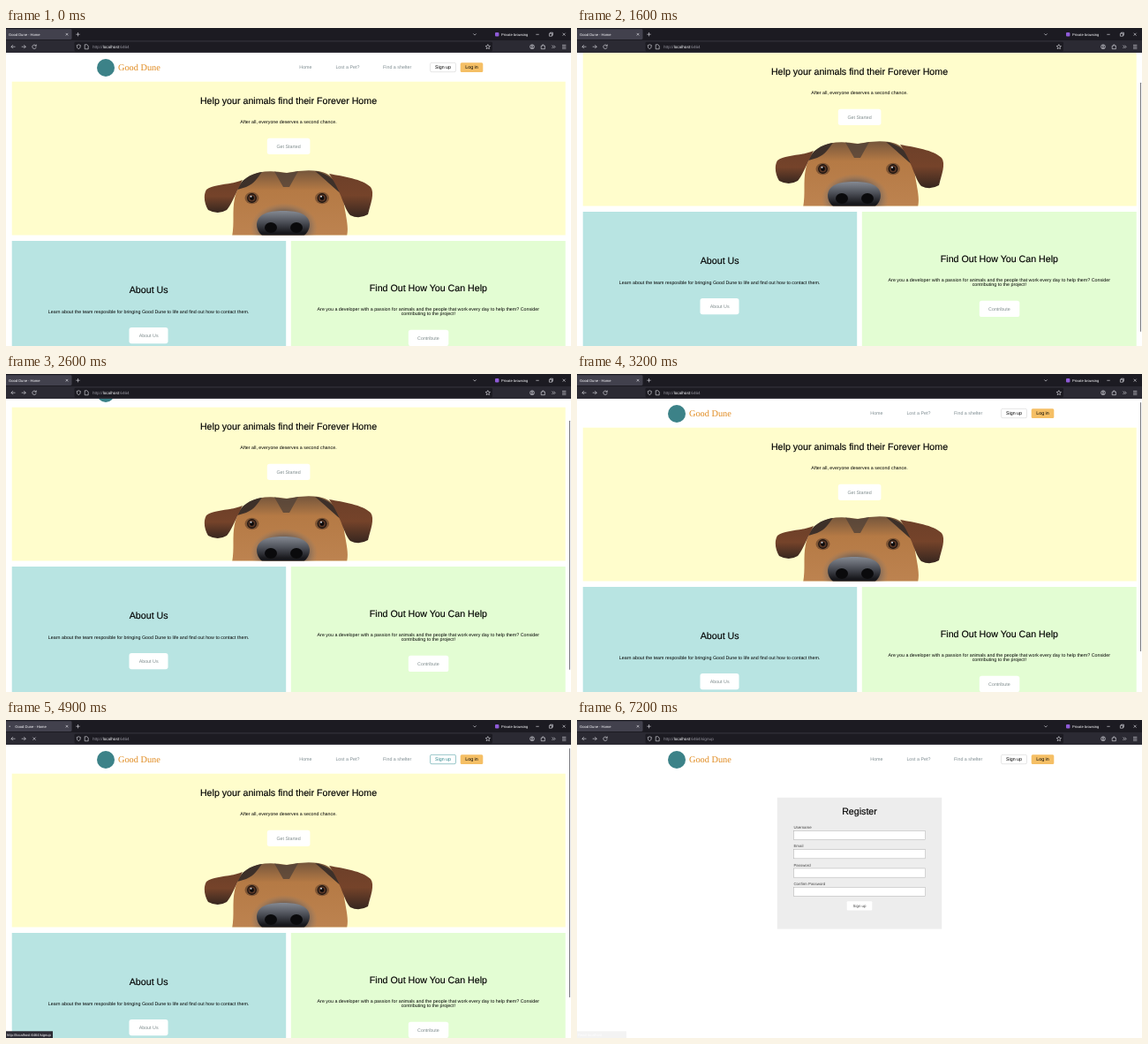
An HTML page for the animation above (8 s loop, 640 by 360 pixels).

```html
<!DOCTYPE html>
<html lang="en">
<head>
<meta charset="utf-8">
<title>Good Dune - Home</title>
<style>
  html, body { margin: 0; width: 100%; height: 100%; overflow: hidden; background: #fff; }
  svg { display: block; width: 100vw; height: 100vh; }
  text { font: 5.333px "Liberation Sans", Arial, sans-serif; text-rendering: geometricPrecision; white-space: pre; }
  .mid { text-anchor: middle; }
  .head { font-size: 10.667px; stroke: #000; stroke-width: .15; }
  .brand { font: 10.3px "Liberation Serif", Times, serif; fill: #e08a1e; }
  .nav { fill: #7f8d92; }
  .soft { fill: #7f8c8d; }
  .btn { fill: #fff; }
  .form text { font-size: 4.4px; fill: #444; }
  .form .head { font-size: 10.667px; fill: #000; }
  .form .field { fill: #fff; stroke: #adadad; stroke-width: .5; }
  .ui { font-size: 4.1px; fill: #fbfbfe; }
  .url { font-size: 4.667px; fill: #96959f; }
  .icon { fill: none; stroke: #e8e8ee; stroke-width: .6; }
  #signBox { fill: #fff; stroke: #d5d5d5; stroke-width: .6; }
  .hover #signBox { stroke: #58a3a6; }
  .hover #signText { fill: #2d878c; }
</style>
</head>
<body>
<svg viewBox="0 0 640 360" preserveAspectRatio="none">
  <defs>
    <clipPath id="heroClip"><rect x="6.7" y="60.7" width="627" height="173.8"/></clipPath>
    <linearGradient id="fur" x2="0" y2="1">
      <stop stop-color="#75563c"/><stop offset=".3" stop-color="#b57a45"/><stop offset="1" stop-color="#bd8350"/>
    </linearGradient>
    <linearGradient id="ear" x2="0" y2="1">
      <stop stop-color="#6d4029"/><stop offset=".5" stop-color="#75432a"/><stop offset="1" stop-color="#36261f"/>
    </linearGradient>
    <radialGradient id="snout">
      <stop offset=".6" stop-color="#5c5350"/><stop offset="1" stop-color="#8f7d6e" stop-opacity="0"/>
    </radialGradient>
    <linearGradient id="nose" x2="0" y2="1">
      <stop stop-color="#858a93"/><stop offset=".4" stop-color="#4b4e56"/><stop offset=".75" stop-color="#17171b"/>
    </linearGradient>
    <g id="eye">
      <ellipse rx="8" ry="6.8" fill="#5a3d28" opacity=".6"/>
      <circle r="5.4" fill="#1d1512"/><circle r="4" fill="#5b3826"/>
      <circle r="2.4" fill="#0d0b0c"/><circle cx="-1" cy="-1.8" r="1" fill="#d5dce4"/>
    </g>
  </defs>

  <g id="page">
    <g id="header">
      <circle cx="113" cy="45" r="10" fill="#3c8288"/>
      <text class="brand" x="127" y="48.2">Good Dune</text>
      <text class="nav" x="332.3" y="46.3">Home</text>
      <text class="nav" x="373.4" y="46.3">Lost a Pet?</text>
      <text class="nav" x="427" y="46.3">Find a shelter</text>
      <rect id="signBox" x="480.5" y="39.4" width="29" height="10.3" rx="1.5"/>
      <text id="signText" class="mid" x="495" y="46.3">Sign up</text>
      <rect x="514.7" y="39.2" width="25.6" height="10.7" rx="1.5" fill="#f5bf65"/>
      <text class="mid" x="527.5" y="46.3">Log in</text>
    </g>

    <g id="home">
      <rect x="6.7" y="60.7" width="627" height="173.8" fill="#fffdcc"/>
      <text class="mid head" x="320" y="85.8">Help your animals find their Forever Home</text>
      <text class="mid" x="320" y="107.8">After all, everyone deserves a second chance.</text>
      <rect class="btn" x="295.8" y="124.7" width="48.6" height="18.3" rx="2.7"/>
      <text class="mid soft" x="320" y="135.8">Get Started</text>

      <g clip-path="url(#heroClip)">
        <path fill="url(#fur)" d="M256 236C259 222 256 207 259 193C262 178 272 167 287 163.5Q300 161 318 164Q338 160 354 162C370 165 379 177 382 193C384 211 389 224 386 236Z"/>
        <path fill="#3d3029" d="M262 183C266 172 276 165 290 163C285 169 282 176 272 180ZM350 162C365 165 376 173 380 188C368 178 361 171 350 162Z"/>
        <path fill="#4f4137" opacity=".75" d="M304 162.5Q318 166 331 162L321 180H314Z"/>
        <path fill="url(#ear)" d="M268 172C254 178 236 176 227 183C223 190 225 199 229 206Q240 212 250 206C256 199 260 187 268 172Z"/>
        <path fill="url(#ear)" d="M366 165C382 168 404 171 413 180C418 187 413 199 410 211Q400 217 390 212C382 203 381 187 366 165Z"/>
        <ellipse cx="315" cy="226" rx="38" ry="28" fill="url(#snout)"/>
        <use href="#eye" x="278.5" y="192.5"/>
        <use href="#eye" x="358" y="192.5"/>
        <path fill="url(#nose)" d="M284 222C285 211 296 207 314 207S343 211 344 222C344 231 337 236 331 240H298C290 236 284 231 284 222Z"/>
        <ellipse cx="300" cy="226" rx="7" ry="6" fill="#0a0a0c"/><ellipse cx="329" cy="226" rx="7" ry="6" fill="#0a0a0c"/>
      </g>

      <rect x="6.7" y="241" width="310.5" height="174" fill="#b8e4e2"/>
      <text class="mid head" x="161.7" y="300.4">About Us</text>
      <text class="mid" x="161.6" y="322.6">Learn about the team resposible for bringing Good Dune to life and find out how to contact them.</text>
      <rect class="btn" x="139.5" y="339" width="44" height="18.3" rx="2.7"/>
      <text class="mid soft" x="161.6" y="350.3">About Us</text>

      <rect x="322.8" y="241" width="310.9" height="174" fill="#e3fdd3"/>
      <text class="mid head" x="478.4" y="297.8">Find Out How You Can Help</text>
      <text class="mid" x="478.3" y="320">Are you a developer with a passion for animals and the people that work every day to help them? Consider</text>
      <text class="mid" x="478.3" y="325.4">contributing to the project!</text>
      <rect class="btn" x="455.8" y="341.8" width="45.5" height="18.3" rx="2.7"/>
      <text class="mid soft" x="478.4" y="353">Contribute</text>
    </g>

    <g id="register" class="form">
      <rect x="226.8" y="87.8" width="186.4" height="148.8" fill="#ededed"/>
      <text class="mid head" x="320" y="107.2">Register</text>
      <g id="fields"></g>
      <rect class="btn" x="305.7" y="205.3" width="28.6" height="10.3" rx="1"/>
      <text class="mid" x="320" y="212">Sign up</text>
    </g>
  </g>

  <rect id="thumb" x="638" width="1" height="282" rx=".5" fill="#77777c"/>

  <g id="status">
    <rect id="statusBox" y="352.3" height="8" fill="#2b2a33"/>
    <text id="statusText" class="ui" x="1" y="357.8"></text>
  </g>

  <g id="browser">
    <rect width="640" height="14" fill="#1c1b22"/>
    <rect y="14" width="640" height="14" fill="#2b2a33"/>
    <rect x="-2" y="1.3" width="76.5" height="11.7" rx="1.4" fill="#42414d"/>
    <rect x="77.5" y="15.8" width="473.5" height="10.6" rx="1.4" fill="#1c1b22"/>
    <circle id="dot" cy="7.2" r=".7" fill="#b9b9c2"/>
    <text id="tab" class="ui" y="8.7"></text>
    <text class="url" x="98" y="23.2">http://<tspan fill="#fbfbfe">localhost</tspan>:6464<tspan id="path"></tspan></text>
    <rect x="554" y="5" width="4.4" height="4.4" rx="1" fill="#8f5bd8"/>
    <text class="ui" x="561" y="8.7">Private browsing</text>
    <path class="icon" d="M67.7 5.9l2.6 2.6m0-2.6l-2.6 2.6M79.3 7.2h4.4M81.5 5v4.4M529.3 6.4l1.7 1.7 1.7-1.7
      M600.3 7.3h3.4M615.4 6.2h3v3h-3zM616.4 6.2v-1h3v3h-1M630.6 5.7l3 3m0-3l-3 3
      M10.5 21.2h-4.6m2-2l-2 2 2 2M17.7 21.2h4.6m-2-2l2 2-2 2
      M82.3 18.8l2.1.8q0 3.2-2.1 4.3-2.1-1.1-2.1-4.3zM89.2 18.8h2.6l1.4 1.4v3.6h-4z
      M545.8 18.6l.8 1.7 1.8.2-1.3 1.3.3 1.8-1.6-.9-1.6.9.3-1.8-1.3-1.3 1.8-.2z
      M606.2 20.2h1.4v-1.2h1.5v1.2h1.3v3.5h-4.2zM618.4 19.6l1.7 1.7-1.7 1.7m2-3.4l1.7 1.7-1.7 1.7
      M630 19.4h4.4m-4.4 1.9h4.4m-4.4 1.9h4.4"/>
    <g class="icon"><circle cx="596" cy="21.2" r="2.4"/><circle cx="596" cy="20.5" r=".8"/><path d="M594.4 22.9q1.6-1.5 3.2 0"/></g>
    <path id="reload" class="icon" d="M33.8 20A2.2 2.2 0 1 0 34.2 21.6M34.3 18.6v1.7h-1.7"/>
    <path id="stop" class="icon" d="M30.4 19.6l3.2 3.2m0-3.2l-3.2 3.2"/>
  </g>
</svg>
<script>
const LOOP = 8000, STEP = 100;
const HOVER = 4200, LOAD = 4500, COMMIT = 6100, PAGE = 6300, LOADED = 6500, LEAVE = 6600, FADE = 6900;
const scrollKeys = [[1000, 0], [1600, 33], [2000, 45], [2200, 45], [2600, 23], [3000, 0]];

const $ = id => document.getElementById(id);
const show = (id, on) => $(id).style.display = on ? "" : "none";
const set = (id, attrs) => { for (const k in attrs) $(id).setAttribute(k, attrs[k]); };
const say = (id, text) => $(id).textContent = text;

$("fields").innerHTML = ["Username", "Email", "Password", "Confirm Password"].map((label, i) => {
  const y = i * 21.33;
  return `<text x="245.4" y="${123.1 + y}">${label}</text>
    <rect class="field" x="245.6" y="${125.3 + y}" width="149" height="10.2"/>`;
}).join("");

function scrollAt(t) {
  const i = scrollKeys.findIndex(k => k[0] > t);
  if (i < 1) return 0;
  const [t0, a] = scrollKeys[i - 1], [t1, b] = scrollKeys[i];
  return a + (b - a) * (t - t0) / (t1 - t0);
}

function statusAt(t) {
  if (t < COMMIT) return ["http://localhost:6464/signup", 53];
  return t < PAGE ? ["localhost", 88] : ["Read localhost", 56];
}

function draw(t) {
  const scroll = scrollAt(t), loading = t >= LOAD && t < LOADED, arrived = t >= COMMIT;
  set("page", { transform: `translate(0 ${-scroll})` });
  set("header", { class: t >= HOVER && t < LEAVE ? "hover" : "" });
  show("home", t < PAGE);
  show("register", t >= PAGE);

  show("thumb", t >= 1000 && t < PAGE);
  set("thumb", { y: 32 + scroll * .9 });

  const [text, width] = statusAt(t);
  show("status", t >= HOVER);
  say("statusText", text);
  set("statusBox", { width });
  set("status", { opacity: t < FADE ? 1 : Math.max(.05, 1 - (t - FADE + STEP) / 400) });

  say("tab", arrived && loading ? "localhost:6464/signup" : "Good Dune - Home");
  set("tab", { x: loading ? 10.3 : 3 });
  say("path", arrived ? "/signup" : "");
  show("dot", loading);
  set("dot", { cx: 5.3 + 1.6 * Math.sin(t / 160) });
  show("stop", loading);
  show("reload", !loading);
}

const start = performance.now();
function tick() {
  const t = (performance.now() - start) % LOOP;
  draw(Math.floor(t / STEP) * STEP);
  requestAnimationFrame(tick);
}
tick();
</script>
</body>
</html>
```
